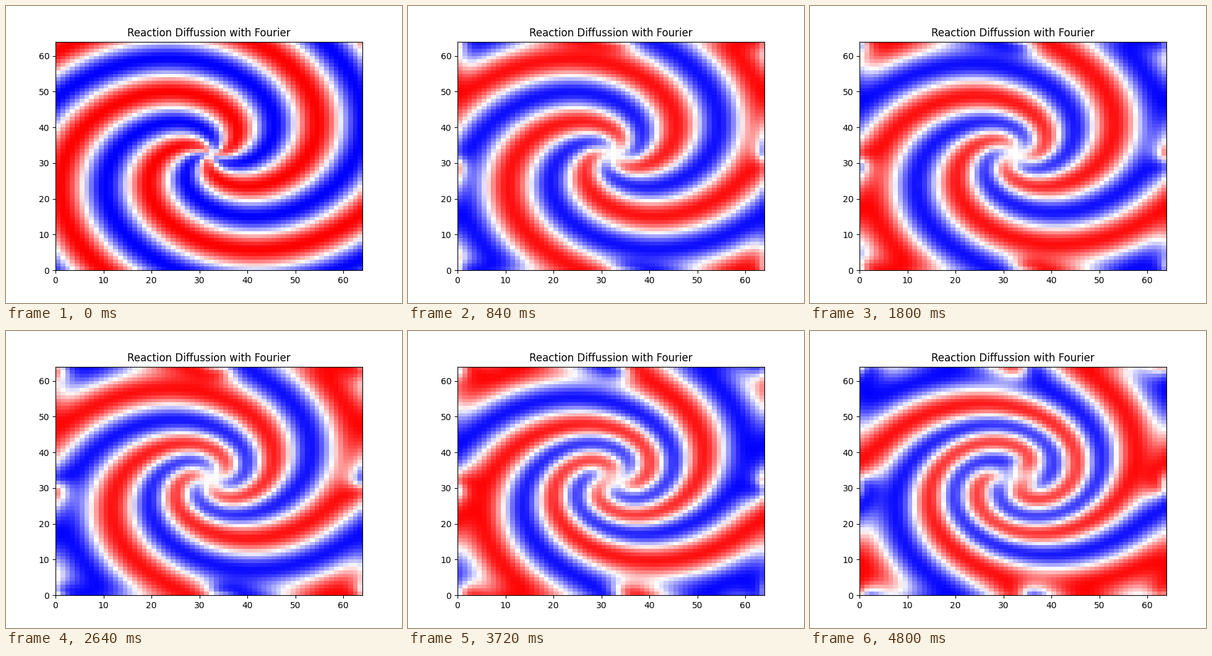
These frames come from a looping animation (640x480 px, 4.92 s). A matplotlib script:

```python
import numpy as np
import matplotlib.pyplot as plt
from matplotlib.animation import FuncAnimation

# Lambda-omega reaction-diffusion on a periodic square, solved with Fourier modes.
N = 64          # grid points per side
L = 20.0        # side length
ARMS = 3        # spiral arms
BETA = 1.0      # rotation strength
D = 0.1         # diffusion
FRAMES = 41
DT = 0.5        # model time per frame
SUBSTEPS = 20

x = np.linspace(-L / 2, L / 2, N + 1)[:N]
X, Y = np.meshgrid(x, x)
k = 2 * np.pi * np.fft.fftfreq(N, L / N)
KX, KY = np.meshgrid(k, k)
K2 = KX**2 + KY**2


def rate(wh):
    """Time derivative of the transformed field w = u + iv."""
    w = np.fft.ifft2(wh)
    a2 = w.real**2 + w.imag**2
    return np.fft.fft2((1 - a2 - 1j * BETA * a2) * w) - D * K2 * wh


def rk4(wh, h):
    k1 = rate(wh)
    k2 = rate(wh + h / 2 * k1)
    k3 = rate(wh + h / 2 * k2)
    k4 = rate(wh + h * k3)
    return wh + h / 6 * (k1 + 2 * k2 + 2 * k3 + k4)


def solve():
    r = np.hypot(X, Y)
    theta = np.arctan2(Y, X)
    w = np.tanh(r) * np.exp(1j * (ARMS * theta - r))
    wh = np.fft.fft2(w)
    out = [w.real]
    for _ in range(FRAMES - 1):
        for _ in range(SUBSTEPS):
            wh = rk4(wh, DT / SUBSTEPS)
        out.append(np.fft.ifft2(wh).real)
    return out


states = solve()

fig, ax = plt.subplots(figsize=(6.4, 4.8), dpi=100)
mesh = ax.pcolormesh(states[0], cmap="bwr", vmin=-1, vmax=1)
ax.set_title("Reaction Diffussion with Fourier")


def update(i):
    mesh.set_array(states[i])
    return (mesh,)


anim = FuncAnimation(fig, update, frames=FRAMES, interval=120, repeat=True, repeat_delay=0)
plt.show()
```
